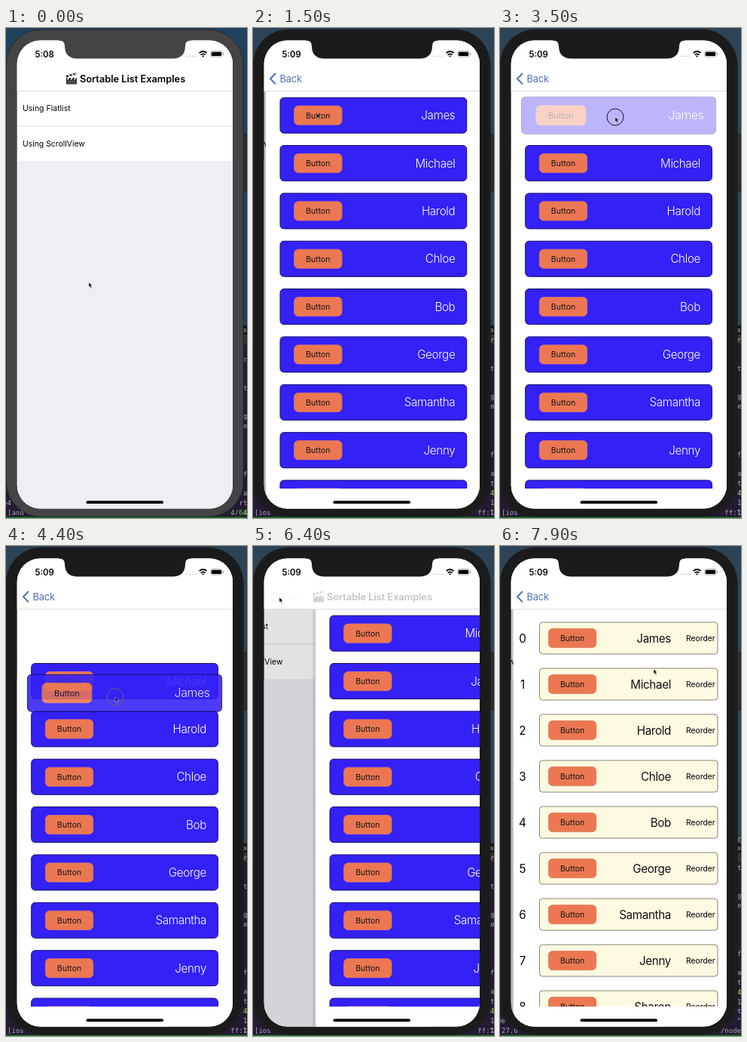
Recreate the animation shown at these times as an HTML page. Size 320 px wide and 649 px high, loop 8000 ms.

```html
<!DOCTYPE html>
<html lang="en">
<head>
<meta charset="utf-8">
<style>
  html, body { margin: 0; width: 100%; height: 100%; overflow: hidden; background: #2d4456; }
  svg { display: block; width: 100vw; height: 100vh; font-family: Inter, "Liberation Sans", sans-serif; }
  .mono { font-family: "DejaVu Sans Mono", monospace; }
  text { white-space: pre; }
</style>
</head>
<body>
<svg id="stage" viewBox="0 0 320 649" preserveAspectRatio="none"></svg>
<script>
const LOOP = 8000, WIDTH = 286, SLOT = 63.35;
const NAMES = ['James', 'Michael', 'Harold', 'Chloe', 'Bob', 'George', 'Samantha', 'Jenny', 'Sharon'];

// Text whose capitals are centred on y.
const text = (x, y, size, str, attrs = '') =>
  `<text x="${x}" y="${y + size * 0.364}" font-size="${size}" ${attrs}>${str}</text>`;
const rect = (x, y, w, h, fill, attrs = '') =>
  `<rect x="${x}" y="${y}" width="${w}" height="${h}" fill="${fill}" ${attrs}/>`;
const name = (x, str, fill, weight) =>
  text(x, 0, 15.2, str, `text-anchor="end" letter-spacing="-.35" font-weight="${weight}" fill="${fill}"`);
const button = (x, stroke) =>
  rect(x, -12.6, 63.4, 25.2, '#eb7852', `rx="5.5" stroke="${stroke}" stroke-width=".8"`) +
  text(x + 31.7, 0, 10.5, 'Button', 'text-anchor="middle" fill="#151515"');

const blueItem = (str, i) => `<g id="blue${i}" transform="translate(0 ${115.7 + i * SLOT})">` +
  rect(33.7, -23.5, 247.7, 47, '#3321f5', 'rx="5" stroke="#150e68"') +
  button(52.3, '#d9737a') + name(266, str, '#fff', 300) + '</g>';

const creamItem = (str, i) => `<g transform="translate(0 ${122 + i * 61})">` +
  text(27, 0, 15.2, i, 'text-anchor="middle"') +
  rect(49.5, -21, 236.5, 42, '#fefae1', 'rx="4" stroke="#77756c" stroke-width=".9"') +
  button(61.4, '#d77a58') + name(224, str, '#111', 400) +
  text(244, 0, 10.35, 'Reorder') + '</g>';

const clapper = `<g transform="translate(79 59)">
  <path d="M1 7h14v8.5H1z" fill="#34383b"/>
  <path d="M1 7h14v2.6H1z" fill="#222"/>
  <path d="M3 7h2l-1 2.6H2zM7.5 7h2l-1 2.6h-2zM12 7h2l-1 2.6h-2z" fill="#eee"/>
  <path d="M.3 4 14 0l.8 2.6L1 6.6z" fill="#222"/>
  <path d="m3 3.2 2-.6 1.6 2.3-2 .6zM7.4 1.9l2-.6L11 3.6l-2 .6zM11.6.7l1.6-.5 1.4 2.3-1.4.4z" fill="#eee"/>
  <path d="M3 11.5h10M3 13.5h10" stroke="#70777b" stroke-width=".6"/></g>`;

const statusBar = text(38.5, 34.5, 11.3, '5:08', 'id="clock" font-weight="600"') +
  [240, 244, 248, 252].map(x => `<circle cx="${x}" cy="37.3" r=".9" fill="#c4c4c4"/>`).join('') +
  `<g fill="none" stroke="#000" stroke-width="1.7">
     <path d="M256.6 33.2q5-4.4 10 0M258.6 35.6q3-2.6 6 0"/></g>
   <path d="M260 37q1.6-1.2 3.2 0l-1.6 1.8z"/>` +
  rect(271.7, 30.6, 15.4, 7.6, 'none', 'rx="2.2" stroke="#888" stroke-width=".7"') +
  rect(272.8, 31.7, 13.2, 5.4, '#000', 'rx="1.2"') +
  rect(288, 33, 1, 2.8, '#888', 'rx=".5"');

// Right-hand scraps of the terminal: x, y, text, colour.
const SCRAPS = [
  [315, 439, 'r'], [315, 477, 't'], [315, 514, 'g'], [315, 527, 'e'], [315, 591, 'f'],
  [315, 616, 'a'], [309.6, 629, 'rt'], [315, 642, '4', '#b5c94c'], [315, 655, '1'],
  [315, 667, 't'], [315, 680, '"']
];
const mono = (x, y, str, fill = '#aaa7b4', attrs = '') =>
  text(x, y, 9, str, `class="mono" fill="${fill}" ${attrs}`);
// Bottom corners for each terminal state: left above, left below, right below, colour.
const CORNERS = [
  ['o4', '[and', '4/64', '#6fc06a'],
  ['', '[ios', 'ff:1', '#aaa7b4'],
  ['de', '27.0', '/node', '#aaa7b4']
].map(([a, b, c, fill], i) => `<g id="corner${i}">` + mono(-4, 629, a) + mono(2, 642, b) +
  mono(320, 642, c, fill, 'text-anchor="end"') + '</g>').join('');

stage.innerHTML = `
<defs>
  <clipPath id="screen">${rect(14.7, 16.5, 286.3, 620, '#000', 'rx="31"')}</clipPath>
  <clipPath id="list">${rect(14, 84, 290, 526, '#000')}</clipPath>
  <linearGradient id="edge"><stop stop-opacity="0"/><stop offset="1" stop-opacity=".14"/></linearGradient>
</defs>
${rect(0, 0, 320, 649, '#2d4456', 'id="wall"')}
${rect(308, 141, 11, 76, '#352e30', 'stroke="#191b20"')}
${rect(308, 394, 12, 12, '#16151a')}${mono(314, 400, 'as')}
${rect(308, 406, 12, 12, '#37302f')}
${rect(0, 418, 320, 231, '#241b33')}
<g id="scraps">${SCRAPS.map(s => mono(...s)).join('')}</g>
${CORNERS}
${rect(0, 647.8, 320, 1.2, '#1d8a25')}
${rect(0.2, 2, 315, 645.5, '#1b1b1b', 'id="bezel" rx="47" stroke="#202124" stroke-width=".8"')}
<g clip-path="url(#screen)">
  ${rect(14, 16, 288, 622, '#fff')}
  <g id="home">
    ${rect(14.7, 176, 287, 462, '#f0eef5')}
    ${rect(14.7, 129.6, 287, 0.9, '#d9d9dc')}
    ${text(22, 106.5, 10.5, 'Using Flatlist')}
    ${text(22, 153, 10.4, 'Using ScrollView')}
  </g>
  ${rect(14, 84, 288, 554, '#000', 'id="dim"')}
  <g id="page">
    ${rect(8.7, 84, 6, 554, 'url(#edge)', 'id="shade"')}
    ${rect(14.7, 84, 287, 554, '#fff')}
    <g clip-path="url(#list)">
      <g id="blueList">${NAMES.map(blueItem).join('')}</g>
      <g id="creamList">${NAMES.map(creamItem).join('')}</g>
    </g>
  </g>
  ${rect(14, 16, 288, 67.6, '#fff')}
  ${rect(14, 83.4, 288, 0.8, '#cfcfd2')}
  <g id="title">${clapper}${text(98, 67, 12.75, 'Sortable List Examples', 'font-weight="600"')}</g>
  <g id="back">
    <path d="m30 60-7 7.2 7 7.2" fill="none" stroke="#4a72b8" stroke-width="2"/>
    ${text(35.5, 67.3, 12.9, 'Back', 'fill="#5272b6" letter-spacing="-.2"')}
  </g>
  ${statusBar}
  ${rect(106.5, 626.3, 102.5, 3.7, '#000', 'rx="1.85"')}
</g>
<path id="notch" d="M70 15v1.5q8 0 8 7 0 17 17 17h126q17 0 17-17 0-7 8-7V15z"/>
<circle id="ring" r="11" fill="none" stroke-width="1"/>
<path id="cursor" d="M0 0v6.3l1.5-1.3 1.2 2.7 1.2-.5-1.2-2.6 2-.2z" fill="#000" stroke="#fff" stroke-opacity=".7" stroke-width=".6"/>`;

const $ = id => document.getElementById(id);
// Eased value(s) along a track of [time, ...values].
function track(keys, t) {
  const i = keys.findIndex(k => k[0] > t);
  if (i < 0) return keys[keys.length - 1].slice(1);
  if (i === 0) return keys[0].slice(1);
  const a = keys[i - 1], b = keys[i];
  const u = (t - a[0]) / (b[0] - a[0]), e = u * u * (3 - 2 * u);
  return a.slice(1).map((v, j) => v + (b[j + 1] - v) * e);
}
const POINTER = [
  [200, 110, 337], [900, 85, 106], [1200, 85, 113], [2000, 85, 113], [2700, 153, 118],
  [3550, 153, 118], [4400, 145, 200], [4800, 143, 186], [5250, 143, 186], [6000, 35, 68],
  [6420, 35, 68], [6850, 122, 145], [7500, 122, 147], [7900, 204, 163]
];
const DRAG = [[3550, 0], [4400, 79], [4800, 66], [5150, 66], [5350, SLOT]];
const FADE = [[3100, 1], [3300, 0.33], [3700, 0.33], [4000, 0.88], [5150, 0.88], [5350, 1]];
const LIFT = [[3200, 1], [3400, 1.042], [5150, 1.042], [5350, 1]];
const SWAP = [[4420, 0], [4700, -SLOT]];

// Critically damped spring from 0 to 1.
function spring(ms) {
  const x = Math.max(0, ms) * 0.01826;
  return 1 - (1 + x) * Math.exp(-x);
}
const clamp = v => Math.min(1, Math.max(0, v));
const set = (id, attrs) => {
  for (const key in attrs) $(id).setAttribute(key, attrs[key]);
};
const place = (id, x, y, more = '') => set(id, { transform: `translate(${x} ${y}) ${more}` });
const show = (id, on) => set(id, { visibility: on ? 'visible' : 'hidden' });

$('blueList').append($('blue0'));  // dragged item stays on top

function draw(t) {
  const open = t < 6350 ? spring(t - 1125) : t < 7540 ? 1 - spring(t - 6350) : spring(t - 7540);
  const state = t < 1000 ? 0 : t < 7300 ? 1 : 2;
  const bezel = state ? '#1b1b1b' : '#444';

  set('wall', { fill: state ? '#2d4456' : '#21425f' });
  set('bezel', { fill: bezel });
  set('notch', { fill: bezel });
  place('scraps', 0, [0, -26, -51][state]);
  for (let i = 0; i < 3; i++) show('corner' + i, i === state);
  $('clock').textContent = state ? '5:09' : '5:08';

  place('home', -86 * open, 0);
  place('page', WIDTH * (1 - open), 0);
  set('dim', { opacity: 0.15 * open });
  set('shade', { opacity: open > 0 && open < 0.9995 ? 1 : 0 });
  set('title', { opacity: clamp(1 - open * 1.012) });
  set('back', { opacity: clamp((open - 0.75) * 4.2) });
  set('blueList', { display: t < 7300 ? 'inline' : 'none' });
  set('creamList', { display: t < 7300 ? 'none' : 'inline' });

  const [scale] = track(LIFT, t);
  place('blue0', 157.7, 115.7 + track(DRAG, t)[0], `scale(${scale}) translate(-157.7 0)`);
  set('blue0', { opacity: track(FADE, t)[0] });
  place('blue1', 0, 115.7 + SLOT + track(SWAP, t)[0]);

  const [x, y] = track(POINTER, t);
  place('cursor', x, y);
  place('ring', x, y);
  show('ring', t >= 3100 && t < 5200);
  set('ring', { stroke: t < 3900 ? '#16143a' : '#6b6270' });
}
function tick() {
  draw(performance.now() % LOOP);
  requestAnimationFrame(tick);
}
tick();
</script>
</body>
</html>
```
